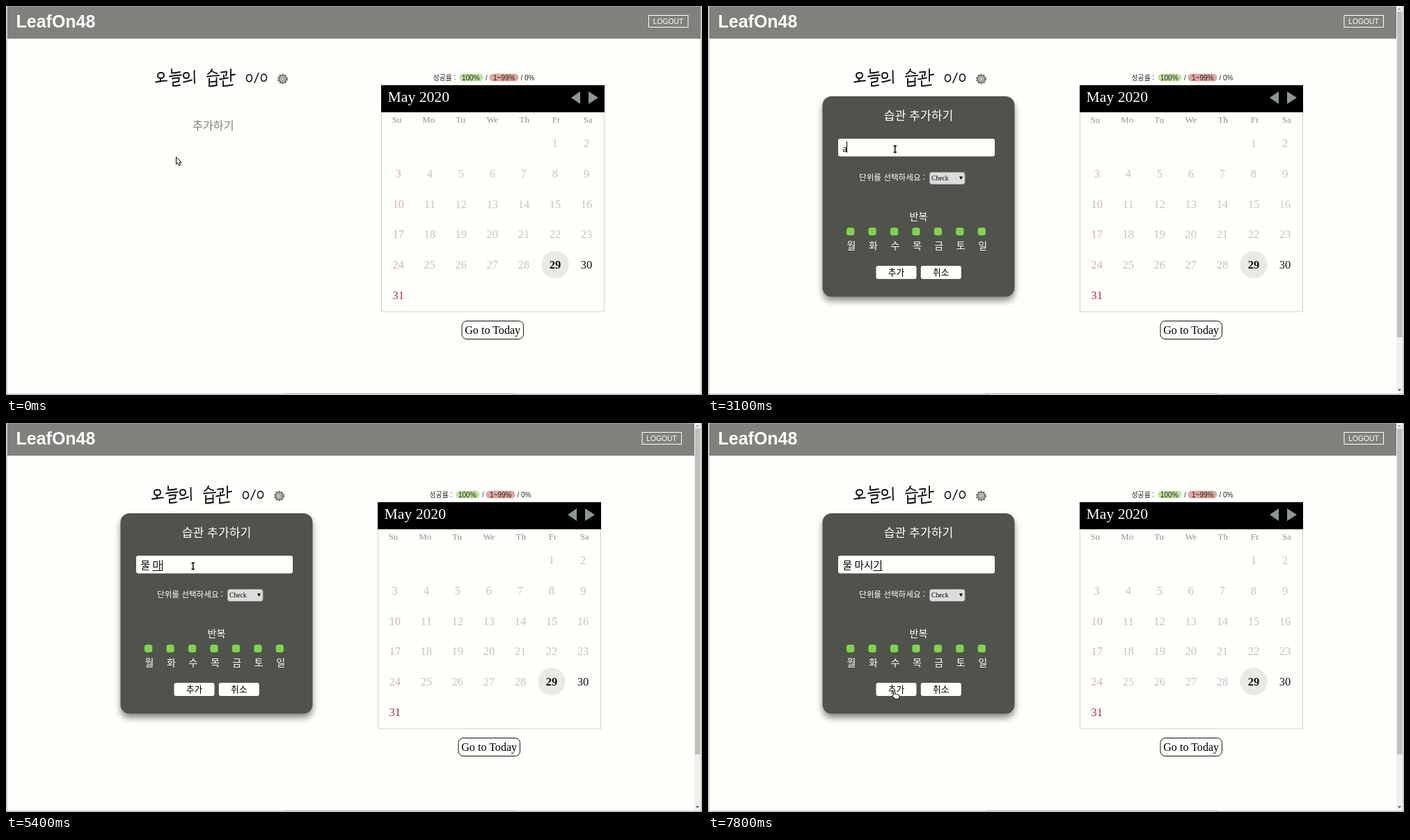
These frames come from a looping animation (1000x560 px, 8000 ms). An HTML page:

```html
<!DOCTYPE html>
<html lang="ko">
<head>
<meta charset="utf-8">
<title>Habit tracker</title>
<style>
  html, body { margin: 0; width: 100%; height: 100%; overflow: hidden; background: #fefffb; }
  svg { display: block; }
  text { white-space: pre; }
  .serif { font-family: "Liberation Serif", "Noto Sans CJK KR", serif; }
  .sans { font-family: "Liberation Sans", sans-serif; }
  .ko { font-family: "Noto Sans CJK KR", "Noto Sans CJK", sans-serif; }
  #panel { filter: drop-shadow(0 6px 5px rgba(0, 0, 0, .45)); }
  .pointer { fill: #fff; stroke: #000; stroke-linejoin: round; }
</style>
</head>
<body>
<svg width="1000" height="560" viewBox="0 0 1000 560">
  <rect width="1000" height="560" fill="#fefffb"/>
  <rect id="bar" x="2" width="996" height="47" fill="#80817c"/>
  <path d="M0 .5H1000" stroke="#a2a39f"/>
  <text class="sans" x="14.5" y="31" font-size="25" font-weight="bold" fill="#fff">LeafOn48</text>
  <g id="logout">
    <rect x="914" y="13.5" width="56.5" height="17" fill="none" stroke="#fff"/>
    <text class="sans" x="942" y="26" font-size="10.3" fill="#fff" text-anchor="middle">LOGOUT</text>
  </g>

  <g id="page">
    <g id="heading" transform="translate(-5)" fill="none" stroke="#15161a" stroke-width="1.9" stroke-linecap="round" stroke-linejoin="round" aria-label="오늘의 습관 0/0">
      <path d="M223 96q-5 0-5 4 0 4 4 4 5 0 5-4 0-4-4-4M222 104v5M215 109.500q8-2 16-2"/>
      <path d="M238 91v5.500q6 0 12-1.500M235 101.500q8-2 17-2M239 104.500q5-1 10-1l-1 5-8 1.500v5q5 0 10-1"/>
      <path d="M259 96q-4 0-4 4 0 4 4 4 4 0 4-4 0-4-4-4M255 109.500q6-1 12-3M270.500 93q0 8 .5 18"/>
      <path d="M296 91q-2 5-6 7M296 94q3 2 7 3M289 101.500q8-1 17-1.500M292 104.500v11q6 0 11-1.500M302.500 103.500v11M293 109.500l9-1"/>
      <path d="M309 95.500l8-1q0 3-1 6M313 99.500v5M307 105.500q6-1 12-2M323 91v17M323 99.500l6-1M312 108v7.500q7-1 14-2"/>
      <path d="M349 98.500q-3.500 1-3.500 5.500t4 5q4-1 4-5.500t-4.500-5M357 110.500l6-14M370 98q-3.500 1-3.500 5.500t4 5q4-1 4-5.500t-4.500-5" stroke-width="1.600"/>
    </g>
    <g fill="none" stroke="#747572">
      <circle cx="392.500" cy="105" r="6.500" stroke-width="2" stroke-dasharray="2.500 1.584"/>
      <circle cx="392.500" cy="105" r="5" stroke-width="2.200"/>
      <circle cx="392.500" cy="105" r="3" stroke="#b9bab7" stroke-width="2"/>
      <circle cx="392.500" cy="105" r="1.800" fill="#fefffb"/>
    </g>
    <text id="add" class="ko" x="263" y="177.500" font-size="16.200">추가하기</text>
    <g id="calendar"></g>
  </g>

  <g id="modal">
    <rect id="panel" x="164.500" y="130" width="276" height="288.500" rx="13" fill="#50524c"/>
    <rect x="187" y="191" width="225" height="25.500" rx="3" fill="#fefffb"/>
    <g id="form"></g>
    <text id="hint" class="ko" x="193.500" y="207.500" font-size="11.600" fill="#757673">새로운 습관을 만들어보세요</text>
    <text id="typed" class="serif" x="193.500" y="209.500" font-size="14.600"></text>
    <path id="underline" stroke="#000"/>
    <path id="caret" stroke="#000"/>
    <g id="scrollbar">
      <rect x="989" width="9.500" height="558" fill="#f0f1ef"/>
      <rect x="990" y="8" width="7.500" height="469" fill="#bfc0be"/>
      <path d="M991 5.500h5l-2.500-3z" fill="#a3a3a3"/>
      <path d="M991 551.500h5l-2.500 3z" fill="#505050"/>
    </g>
  </g>

  <path d="M1 0V560M999 0V560" stroke="#c9cac7" stroke-width="2"/>
  <path d="M0 559H1000" stroke="#b4b5b2" stroke-width="1.500"/>
  <path d="M400.500 560v-1.500h330v1.500" fill="#fff" stroke="#8c8d8a"/>

  <path id="arrow" class="pointer" d="M0 0V10.500L2.400 8.400 4.100 12.200 6 11.400 4.400 7.700H7.500Z"/>
  <g id="beam" fill="none">
    <path d="M-2 -4.500H2M0 -4.500V4.500M-2 4.500H2" stroke="#000" stroke-width="2.200"/>
    <path d="M0 -4V4" stroke="#ddd" stroke-width=".7"/>
  </g>
  <path id="hand" class="pointer" d="M2 6V1.500Q3 -.5 4 1.500V4.500Q6 3.500 6.500 5 8.500 4.500 8.500 5.700 10.500 5.500 10.500 7V9L9.500 11.500H4L.5 7.500Q.5 5.500 2 6Z"/>
</svg>
<script>
const $ = id => document.getElementById(id);
const text = (s, x, y, size, fill, cls = 'ko', extra = '') =>
  `<text class="${cls}" x="${x}" y="${y}" font-size="${size}" fill="${fill}" ${extra}>${s}</text>`;
const mid = (s, x, y, size, fill, cls, extra = '') =>
  text(s, x, y, size, fill, cls, 'text-anchor="middle" ' + extra);
const rect = (x, y, w, h, r, fill, extra = '') =>
  `<rect x="${x}" y="${y}" width="${w}" height="${h}" rx="${r}" fill="${fill}" ${extra}/>`;

function calendar() {
  let s = text('성공률 :', 608.5, 107, 9.9, '#222') +
    rect(646.5, 97.5, 34, 11, 5.5, '#c0e3a1') + rect(689.5, 97.5, 42, 11, 5.5, '#dfa89e') +
    text('100%', 650, 106.7, 10, '#222', 'sans') + text('/', 684, 106.7, 10, '#222', 'sans') +
    text('1~99%', 695, 106.7, 10, '#222', 'sans') + text('/ 0%', 734.5, 106.7, 10, '#222', 'sans') +
    rect(534.5, 114.5, 320, 325.5, 0, 'none', 'stroke="#cfd3d0"') +
    rect(534, 114, 321, 39, 0, '#000') + text('May 2020', 543.5, 138, 21.7, '#fff', 'serif') +
    '<path d="M807 132l13-9v18zM846 132l-14-9v18z" fill="#8c9795"/>';
  ['Su', 'Mo', 'Tu', 'We', 'Th', 'Fr', 'Sa'].forEach((d, i) =>
    s += mid(d, 556.5 + 45.8 * i, 168, 12.9, '#8b9695', 'serif'));
  s += '<circle cx="784" cy="372.3" r="19.700" fill="#e9eae6"/>';
  for (let day = 1; day <= 31; day++) {
    const cell = day + 4, col = cell % 7, row = cell / 7 | 0;
    const fill = day == 31 ? '#a03a40' : day > 28 ? '#111' : col ? '#c2c5c4' : '#d7b2b2';
    s += mid(day, 558.7 + 45.05 * col, 203.3 + 43.65 * row, 16.5, fill, 'serif',
      day == 29 ? 'font-weight="bold"' : '');
  }
  return s + rect(650, 453.5, 88.5, 26, 7, '#fefffb', 'stroke="#111"') +
    mid('Go to Today', 694.2, 472.3, 16.1, '#000', 'serif');
}

function form() {
  let s = mid('습관 추가하기', 302.5, 164, 17.2, '#fff') +
    text('단위를 선택하세요 :', 217, 251, 11.6, '#fff') +
    rect(318.5, 239.5, 50.5, 17, 3, '#dcdddb', 'stroke="#a5a6a3"') +
    text('Check', 321, 251.2, 9.6, '#000', 'serif') +
    '<path d="M361 245.500h5l-2.500 4.500z"/>' + mid('반복', 302.5, 307.5, 14, '#fff');
  [...'월화수목금토일'].forEach((d, i) =>
    s += rect(199 + 31.45 * i, 319, 11.3, 11.3, 3.5, '#7fd54a') +
      mid(d, 206 + 31.45 * i, 349.5, 14, '#fff'));
  ['추가', '취소'].forEach((label, i) =>
    s += rect(241.5 + 64.3 * i, 374, 58, 19, 3, '#fefffb') +
      mid(label, 270.5 + 64.3 * i, 388.2, 12.8, '#000'));
  return s;
}

$('calendar').innerHTML = calendar();
$('form').innerHTML = form();

// [start ms, field text, letters being composed]
const typing = [
  [0, '', 0], [3100, 'a', 0], [3700, '', 0],
  [4200, 'ㅁ', 1], [4300, '무', 1], [4400, '물', 1],
  [5200, '물 ', 0], [5300, '물 ㅁ', 1], [5400, '물 마', 1], [5500, '물 맛', 1],
  [5600, '물 마시', 1], [5700, '물 마식', 1], [5800, '물 마시기', 1]
];
// [start ms, pointer, x, y, ms of travel from the previous place]
const moves = [
  [0, 'arrow', 244.5, 217.5, 0], [500, 'arrow', 287.5, 178.5, 400],
  [2300, 'beam', 276, 197.5, 0], [2400, 'beam', 268.7, 206, 200],
  [7000, 'arrow', 276.5, 227.5, 0], [7100, 'arrow', 266.5, 384, 500],
  [7600, 'hand', 264.5, 385, 0], [7800, 'hand', 264.5, 385.7, 0]
];
// the caret toggles at each of these times
const blinks = [2800, 3900, 4200, 6400, 7000, 7600];

const show = (id, on) => $(id).setAttribute('visibility', on ? 'visible' : 'hidden');

function movePointer(t) {
  const i = moves.findLastIndex(m => m[0] <= t);
  const [start, kind, x, y, ms] = moves[i];
  const [, , px, py] = moves[i - 1] || moves[i];
  const p = ms ? Math.min(1, (t - start) / ms) : 1, k = p * p * (3 - 2 * p);
  for (const id of ['arrow', 'beam', 'hand']) show(id, id == kind);
  $(kind).setAttribute('transform', `translate(${px + (x - px) * k} ${py + (y - py) * k})`);
}

function typeText(t) {
  const [, value, composing] = typing.findLast(row => row[0] <= t);
  const field = $('typed');
  field.textContent = value;
  const end = 193.5 + (value ? field.getComputedTextLength() : 0);
  const x = Math.floor(end) + .5, top = t < 4200 ? 195 : 197;
  $('caret').setAttribute('d', `M${x} ${top}v16`);
  $('underline').setAttribute('d', `M${end - 13.4} 212.500H${end}`);
  show('caret', blinks.filter(b => b <= t).length % 2);
  show('underline', composing);
  show('hint', t >= 1700 && !value);
}

function draw(now) {
  const t = Math.floor(now % 8000 / 100) * 100, open = t >= 1700;
  $('modal').style.display = open ? '' : 'none';
  $('bar').setAttribute('width', open ? 987 : 996);
  $('logout').setAttribute('transform', `translate(${open ? 0 : 9.5})`);
  $('page').setAttribute('transform', `translate(${open ? 0 : 5})`);
  show('add', !open);
  $('add').setAttribute('fill', t < 800 ? '#7d7e7a' : t < 1600 ? '#b4b5b1' : '#dcddd9');
  typeText(t);
  movePointer(t);
}

const begin = performance.now();
function loop() {
  draw(performance.now() - begin);
  requestAnimationFrame(loop);
}
loop();
</script>
</body>
</html>
```
